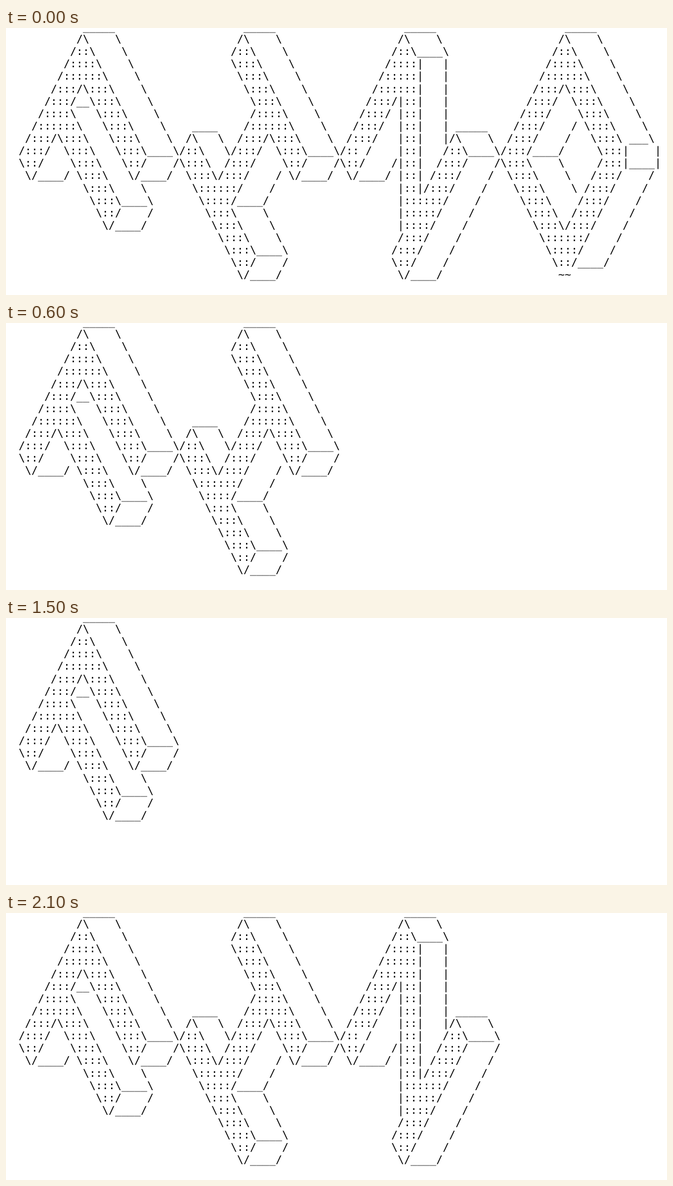
These frames come from a looping animation (1176x476 px, 2.4 s). An HTML page:

```html
<!DOCTYPE html>
<html lang="en">
<head>
<meta charset="utf-8">
<title>ASCII letters</title>
<style>
  html, body { margin: 0; width: 100%; height: 100%; overflow: hidden; background: #fff; }
  svg { display: block; width: 1176px; height: 476px; }
  text {
    font: 19px "DejaVu Sans Mono", monospace;
    font-variant-ligatures: none;
    text-rendering: geometricPrecision;
    white-space: pre;
    fill: #000;
  }
</style>
</head>
<body>
<svg id="stage" viewBox="0 0 1176 476"></svg>
<script>
const letters = [String.raw`
          _____
         /\    \
        /::\    \
       /::::\    \
      /::::::\    \
     /:::/\:::\    \
    /:::/__\:::\    \
   /::::\   \:::\    \
  /::::::\   \:::\    \
 /:::/\:::\   \:::\    \
/:::/  \:::\   \:::\____\
\::/    \:::\   \::/    /
 \/____/ \:::\   \/____/
          \:::\    \
           \:::\____\
            \::/    /
             \/____/
`, String.raw`
          _____
         /\    \
        /::\    \
        \:::\    \
         \:::\    \
          \:::\    \
           \:::\    \
           /::::\    \
  ____    /::::::\    \
 /\   \  /:::/\:::\    \
/::\   \/:::/  \:::\____\
\:::\  /:::/    \::/    /
 \:::\/:::/    / \/____/
  \::::::/    /
   \::::/____/
    \:::\    \
     \:::\    \
      \:::\    \
       \:::\____\
        \::/    /
         \/____/
`, String.raw`
          _____
         /\    \
        /::\____\
       /::::|   |
      /:::::|   |
     /::::::|   |
    /:::/|::|   |
   /:::/ |::|   |
  /:::/  |::|   | _____
 /:::/   |::|   |/\    \
/:: /    |::|   /::\____\
\::/    /|::|  /:::/    /
 \/____/ |::| /:::/    /
         |::|/:::/    /
         |::::::/    /
         |:::::/    /
         |::::/    /
         /:::/    /
        /:::/    /
        \::/    /
         \/____/
`, String.raw`
          _____
         /\    \
        /::\    \
       /::::\    \
      /::::::\    \
     /:::/\:::\    \
    /:::/  \:::\    \
   /:::/    \:::\    \
  /:::/    / \:::\    \
 /:::/    /   \:::\ ___\
/:::/____/     \:::|    |
\:::\    \     /:::|____|
 \:::\    \   /:::/    /
  \:::\    \ /:::/    /
   \:::\    /:::/    /
    \:::\  /:::/    /
     \:::\/:::/    /
      \::::::/    /
       \::::/    /
        \::/____/
         ~~
`];

const STEP = 300, STEPS = 8;
const LEFT = 22.4, BASE = 4, LINE = 22.12, ADVANCE = 285.75;
const stage = document.getElementById("stage");

function add(parent, tag, attrs = {}) {
  const el = document.createElementNS("http://www.w3.org/2000/svg", tag);
  for (const key in attrs) el.setAttribute(key, attrs[key]);
  return parent.appendChild(el);
}

letters.forEach((art, i) => {
  const group = add(stage, "g");
  art.slice(1, -1).split("\n").forEach((line, row) => {
    const x = LEFT + i * ADVANCE, y = BASE + row * LINE;
    add(group, "text", { x, y }).textContent = line;
  });

  // Letters vanish from right to left, then return from left to right.
  group.animate([
    { opacity: 1, offset: 0, easing: "step-end" },
    { opacity: 0, offset: (4 - i) / STEPS, easing: "step-end" },
    { opacity: 1, offset: (5 + i) / STEPS, easing: "step-end" },
    { opacity: 1, offset: 1 }
  ], { duration: STEP * STEPS, iterations: Infinity });
});
</script>
</body>
</html>
```
